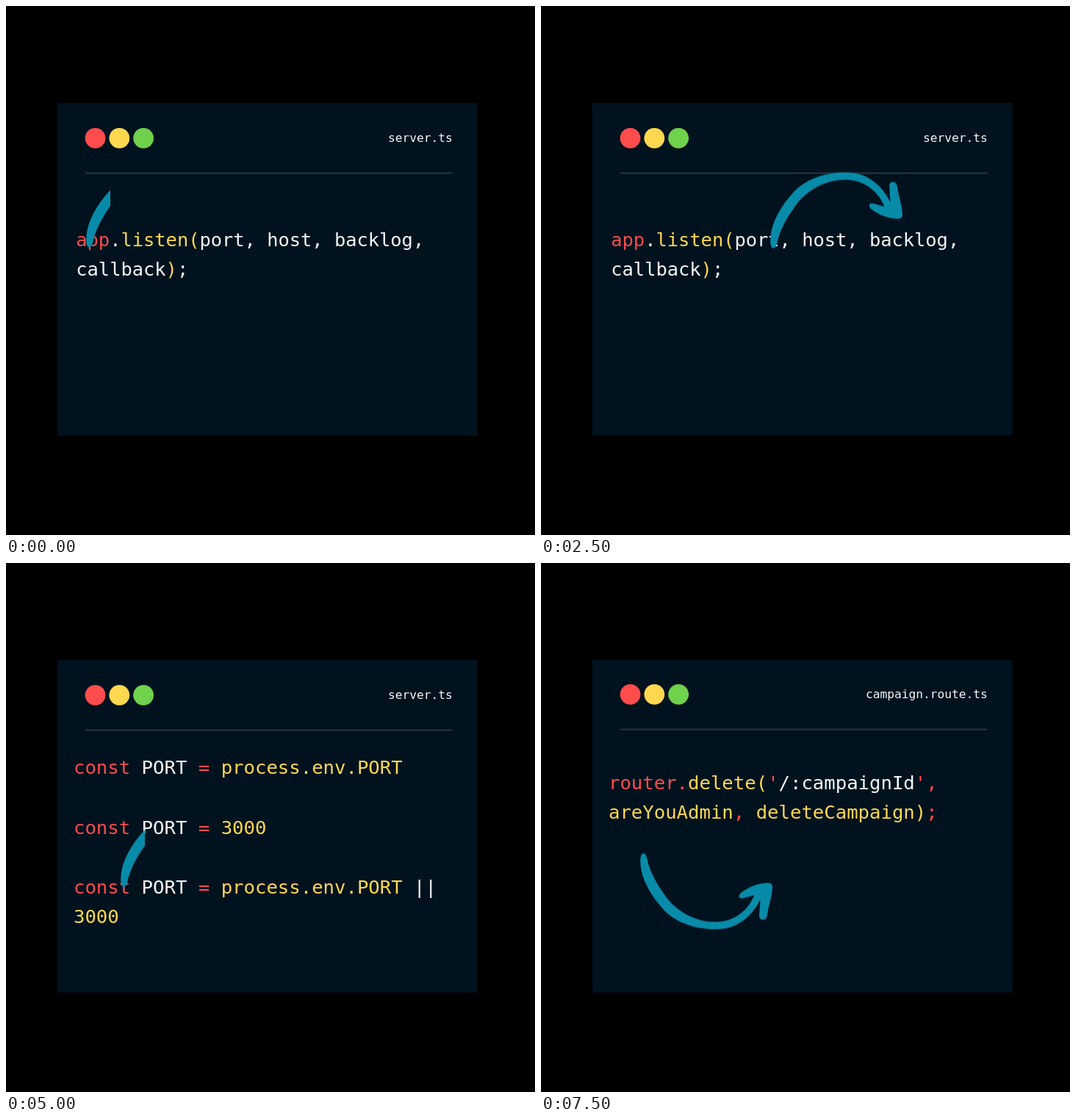
Animation, 720 px wide and 720 px high, one loop 8000 ms. Source, as an HTML page:

```html
<!DOCTYPE html>
<html lang="en">
<head>
<meta charset="utf-8">
<title>Express server snippets</title>
<style>
  html, body { margin: 0; width: 100%; height: 100%; overflow: hidden; background: #000; }
  #stage { position: relative; width: 720px; height: 720px; overflow: hidden; }
  #stage > * { position: absolute; left: 0; top: 0; }
  svg { display: block; }

  text { font: 25.65px "DejaVu Sans Mono", monospace; white-space: pre; fill: #f4f8fa; }
  .call { font-size: 25.4px; }
  .file { font-size: 16.2px; text-anchor: end; }
  .r { fill: #ff4c4c; }
  .y { fill: #ffd84f; }

  #header { animation: nudge 8s step-end infinite; }
  #pages { animation: turn 8s step-end infinite; }
  #place { animation: place 8s step-end infinite; }
  #wipe { height: 106px; overflow: hidden; animation: wipe 1s step-end infinite; }

  @keyframes nudge {
    0% { transform: none; }
    75%, 100% { transform: translateY(-1px); }
  }
  @keyframes turn {
    0% { transform: none; }
    37.5% { transform: translateY(-720px); }
    75% { transform: translateY(-1440px); }
    87.5%, 100% { transform: translateY(-2160px); }
  }
  @keyframes place {
    0% { transform: translate(108px, 224px); }
    12.5% { transform: translate(207px, 233px); }
    25% { transform: translate(311px, 225.5px); }
    37.5% { transform: translate(201.5px, 161px); }
    50% { transform: translate(135px, 256px); }
    62.5% { transform: translate(155px, 336.5px); }
    75% { transform: translate(116.5px, 434.5px) scaleY(-1); }
    87.5%, 100% { transform: translate(134px, 393.5px) scaleY(-1); }
  }
  @keyframes wipe {
    0% { width: 34px; }
    10% { width: 68px; }
    20% { width: 101px; }
    30% { width: 135px; }
    40% { width: 168px; }
    50%, 100% { width: 184px; }
  }
</style>
</head>
<body>
<div id="stage">
  <svg width="720" height="720">
    <rect x="70" y="132" width="571.8" height="452.6" fill="#00121e"/>
    <g id="header">
      <circle cx="121.5" cy="179.8" r="13.9" fill="#ff4c4c"/>
      <circle cx="154.3" cy="179.8" r="13.9" fill="#ffd84f"/>
      <circle cx="187.1" cy="179.8" r="13.9" fill="#70d14c"/>
      <rect x="108" y="226.5" width="499.5" height="2" fill="#293743"/>
    </g>
  </svg>

  <svg id="pages" width="720" height="2880">
    <g>
      <text class="file" x="607.7" y="185.3">server.ts</text>
      <text class="call" x="95.3" y="327.3"><tspan class="r">app</tspan>.<tspan class="y">listen(</tspan>port, host, backlog,</text>
      <text class="call" x="95.3" y="367.4">callback<tspan class="y">)</tspan>;</text>
    </g>
    <g transform="translate(0 720)">
      <text class="file" x="607.7" y="185.3">server.ts</text>
      <text x="92" y="287"><tspan class="r">const</tspan> PORT <tspan class="r">=</tspan> <tspan class="y">process.env.PORT</tspan></text>
      <text x="92" y="368.5"><tspan class="r">const</tspan> PORT <tspan class="r">=</tspan> <tspan class="y">3000</tspan></text>
      <text x="92" y="449.8"><tspan class="r">const</tspan> PORT <tspan class="r">=</tspan> <tspan class="y">process.env.PORT</tspan> ||</text>
      <text x="92" y="490.3"><tspan class="y">3000</tspan></text>
    </g>
    <g transform="translate(0 1440)">
      <text class="file" x="607.7" y="184.3">server.ts</text>
      <text x="92" y="307.5"><tspan class="r">app.</tspan><tspan class="y">use(</tspan><tspan class="r">express.</tspan><tspan class="y">json())</tspan><tspan class="r">;</tspan></text>
      <text x="92" y="388.8"><tspan class="r">app.</tspan><tspan class="y">use(</tspan><tspan class="r">'</tspan>/api/users<tspan class="r">', UserRoute</tspan><tspan class="y">)</tspan><tspan class="r">;</tspan></text>
    </g>
    <g transform="translate(0 2160)">
      <text class="file" x="607.7" y="184.3">campaign.route.ts</text>
      <text x="92" y="307.5"><tspan class="r">router.</tspan><tspan class="y">delete(</tspan><tspan class="r">'</tspan>/:campaignId<tspan class="r">',</tspan></text>
      <text x="92" y="348"><tspan class="y">areYouAdmin</tspan><tspan class="r">,</tspan> <tspan class="y">deleteCampaign)</tspan><tspan class="r">;</tspan></text>
    </g>
  </svg>

  <div id="place">
    <div id="wipe">
      <svg width="184" height="106" viewBox="-1 -1.5 184 106">
        <path fill="#078ba9" d="M1.5 101 C0 97 0 92 .5 87 C2 68 14 45 33 25
          C51 7 77 -.5 103 -.5 C131 -.5 151 15 163.5 40 L162 18 C162 11 171 11 172.5 17
          C174 29 179 42 180 56 C180 60 179 62 175 62.5 C162 63 147 57 137 49
          C132 43 136 40 141 42 L155.5 46 C147 25 128 9.5 102 9.5
          C77 9.5 50 22 33.5 46 C21 63 12 81 9 97 C8 103 3 104 1.5 101 Z"/>
      </svg>
    </div>
  </div>
</div>
</body>
</html>
```
